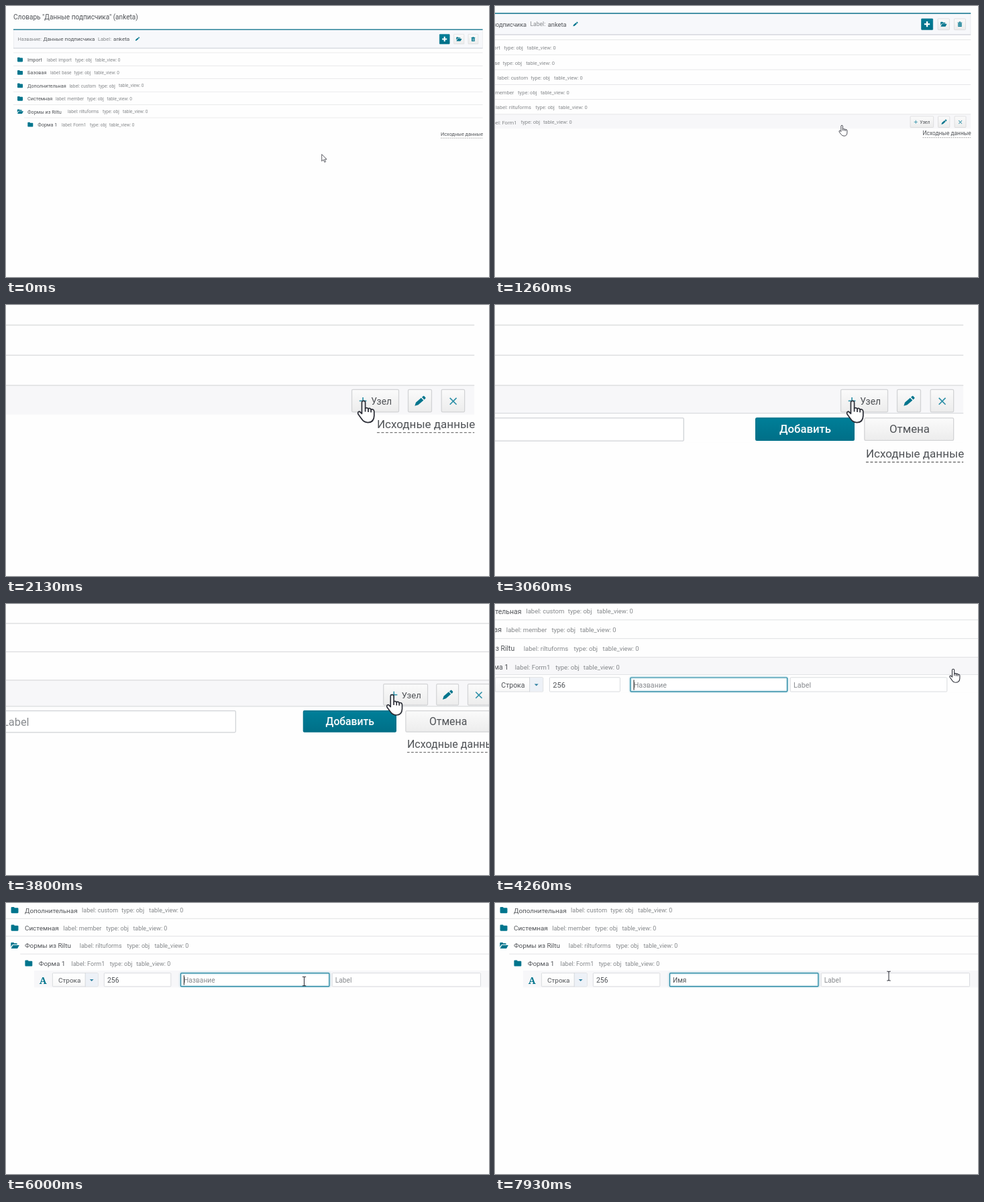
Recreate the animation shown at these times as an HTML page with a canvas. Size 720 by 405 pixels, loop 8000 ms.

```html
<!DOCTYPE html>
<html lang="ru">
<head>
<meta charset="utf-8">
<style>
  html, body { margin: 0; width: 100%; height: 100%; overflow: hidden; background: #fefefe; }
  canvas { display: block; width: 720px; height: 405px; }
</style>
</head>
<body>
<canvas id="stage" width="720" height="405"></canvas>
<script>
const ctx = document.getElementById('stage').getContext('2d');
const LOOP = 8000;
const TEAL = '#00758d', DARK = '#505357', GREY = '#85888b', RULE = '#dcdddf', HOVER = '#f7f7f9';
const ROW_TOP = 69.9, ROW_STEP = 19.42, FORM_TOP = 185.2, FORM_HEIGHT = 19, RIGHT = 710.6;

// name, label, then the x of the label, type and table_view captions
const rows = [
  ['Import', 'import', 61, 103, 133],
  ['Базовая', 'base', 66, 101.5, 131.5],
  ['Дополнительная', 'custom', 94.5, 138, 168],
  ['Системная', 'member', 74, 121, 150.5],
  ['Формы из Riltu', 'riltuforms', 92, 144, 174],
  ['Форма 1', 'Form1', 83, 125, 154]
];

const icons = {
  folder: new Path2D('M-4 -2.6Q-4 -3.4 -3.2 -3.4H-1Q-.3 -3.4 -.3 -2.5H3.2Q4 -2.5 4 -1.7V2.5Q4 3.3 3.2 3.3H-3.2Q-4 3.3 -4 2.5Z'),
  open: new Path2D('M-4.2 1.6V-2.6Q-4.2 -3.4 -3.4 -3.4H-1.4Q-.7 -3.4 -.7 -2.5H2Q2.8 -2.5 2.8 -1.1H-1.8Q-2.6 -1.1 -3 -.5ZM-4 3.3L-2.2 -.1Q-2 -.5 -1.5 -.5H5L3.2 2.8Q2.9 3.3 2.4 3.3Z'),
  pencil: new Path2D('M-3.5 3.2L-2.8 1L.6 -2L2.1 -.4L-1.3 2.6ZM1.1 -2.4L1.9 -3.1Q2.3 -3.4 2.7 -3L3.4 -2.2Q3.7 -1.8 3.3 -1.5L2.6 -.8Z'),
  trash: new Path2D('M-3 -2.6H-1V-3.5H1V-2.6H3V-1.7H-3ZM-2.5 -1.2H2.5V3.4H-2.5ZM-1.3 -.4V2.6H-.9V-.4ZM-.2 -.4V2.6H.2V-.4ZM.9 -.4V2.6H1.3V-.4Z'),
  plus: new Path2D('M-1 -3.6H1V-1H3.6V1H1V3.6H-1V1H-3.6V-1H-1Z'),
  caretDown: new Path2D('M-2.1 -1H2.1L0 1.2Z'),
  arrow: new Path2D('M0 0V10.2L2.4 8L4.2 11.8L5.8 11L4.1 7.4H7.4Z'),
  hand: new Path2D('M-1.7 1.1Q-1.7 0 -.6 0T.5 1.1V4.7Q1.5 4 2.4 5Q3.5 4.4 4.2 5.5Q6 5.1 6.2 6.8V9.6Q6.1 13.9 2.2 13.9Q-.4 13.9 -2 11.4L-4.1 8.5Q-4.6 7 -3.2 6.8L-1.7 8.2Z'),
  knuckles: new Path2D('M.5 4.7V7M2.4 5V7.2M4.2 5.5V7.4'),
  beam: new Path2D('M-2 -5H-.6L0 -4.5L.6 -5H2M0 -4.5V4.5M-2 5H-.6L0 4.5L.6 5H2')
};

const clamp = v => Math.max(0, Math.min(1, v));
const span = (t, a, b) => clamp((t - a) / (b - a));
const lerp = (a, b, p) => a + (b - a) * p;
const cubic = t => t < .5 ? 4 * t ** 3 : 1 - 4 * (1 - t) ** 3;
const sine = t => (1 - Math.cos(Math.PI * t)) / 2;
const mix = (a, b, p) => a.map((v, i) => lerp(v, b[i], p));

function text(str, x, y, size, color, weight = 400, family = 'Roboto, sans-serif') {
  ctx.font = `${weight} ${size}px ${family}`;
  ctx.fillStyle = color;
  ctx.fillText(str, x, y + size * .36);
}

function rect(x1, y1, x2, y2, color) {
  ctx.fillStyle = color;
  ctx.fillRect(x1, y1, x2 - x1, y2 - y1);
}

// the border lies inside the given edges
function box(x1, y1, x2, y2, fill, stroke, width = .55) {
  ctx.beginPath();
  ctx.roundRect(x1 + width / 2, y1 + width / 2, x2 - x1 - width, y2 - y1 - width, .7);
  ctx.fillStyle = fill;
  ctx.fill();
  ctx.strokeStyle = stroke;
  ctx.lineWidth = width;
  ctx.stroke();
}

function shade(y1, y2, from, to) {
  const g = ctx.createLinearGradient(0, y1, 0, y2);
  g.addColorStop(0, from);
  g.addColorStop(1, to);
  return g;
}

function button(x1, y1, x2, y2, primary) {
  if (primary) box(x1, y1, x2, y2, shade(y1, y2, '#007f99', '#006f87'), '#00728a');
  else box(x1, y1, x2, y2, shade(y1, y2, '#fbfbfb', '#ececec'), '#d2d3d5');
}

function icon(name, x, y, color = TEAL, scale = 1) {
  ctx.save();
  ctx.translate(x, y);
  ctx.scale(scale, scale);
  ctx.fillStyle = color;
  ctx.fill(icons[name], 'evenodd');
  ctx.restore();
}

function cross(x, y, r, turned) {
  ctx.save();
  ctx.translate(x, y);
  if (turned) ctx.rotate(Math.PI / 4);
  rect(-r, -.35, r, .35, '#2a8ea6');
  rect(-.35, -r, .35, r, '#2a8ea6');
  ctx.restore();
}

function drawHeader() {
  text('Словарь "Данные подписчика" (anketa)', 11, 16, 10.1, DARK);
  rect(11, 35, RIGHT, 63, '#f7f8fb');
  rect(11, 36, 11.6, 63, '#e6e8ec');
  rect(RIGHT - .6, 36, RIGHT, 63, '#e6e8ec');
  rect(11, 62.4, RIGHT, 63.7, '#d6d9de');
  rect(11, 34.5, RIGHT, 36, '#2a8299');
  text('Название:', 17.5, 49.5, 7.4, GREY);
  text('Данные подписчика', 55.5, 49.5, 8, DARK);
  text('Label:', 137, 49.5, 7.5, GREY);
  text('anketa', 160, 49.5, 8.1, DARK);
  icon('pencil', 196, 49.2, TEAL, .9);
  button(646, 42, 661.5, 57, true);
  button(667.4, 42, 683.1, 57);
  button(688.7, 42, 704.1, 57);
  icon('plus', 653.7, 49.4, '#fff');
  icon('open', 675, 49.5, TEAL, .9);
  icon('trash', 696.4, 49.5, TEAL, .95);
}

function drawRows(hovered) {
  rows.forEach(([name, label, labelX, typeX, tableX], i) => {
    const top = ROW_TOP + ROW_STEP * i, y = top + 10.4, indent = i === 5 ? 15.3 : 0;
    if (i === 5 && hovered) rect(27, top, RIGHT, 185.8, HOVER);
    rect(i === 5 ? 27 : 11, top - .3, RIGHT, top + .3, RULE);
    icon(i === 4 ? 'open' : 'folder', 21 + indent, y - .2);
    text(name, 32 + indent, y, 7.25, DARK);
    text('label: ' + label, labelX, y, 6.65, GREY);
    text('type: obj', typeX, y, 6.6, GREY);
    text('table_view: 0', tableX, y, 6.55, GREY);
  });
  if (!hovered) return;
  button(631.6, 169.4, 662.3, 184.4);
  button(667.8, 169.4, 683.4, 184.4);
  button(689.2, 169.4, 704.6, 184.4);
  cross(639, 177, 2.3);
  text('Узел', 644.2, 177.2, 6, DARK);
  icon('pencil', 675.8, 177);
  cross(697, 177.2, 3, true);
}

function drawLink(open) {
  const y = 191.8 + FORM_HEIGHT * open;
  text('Исходные данные', 648, y, 7.33, DARK);
  ctx.strokeStyle = '#777';
  ctx.lineWidth = .55;
  ctx.setLineDash([1.7, 1.1]);
  ctx.beginPath();
  ctx.moveTo(648, y + 5.6);
  ctx.lineTo(RIGHT, y + 5.6);
  ctx.stroke();
  ctx.setLineDash([]);
}

function caretOn(t) {
  if (t >= 6460) return t < 7500;
  return ((t - 3870) % 1060 + 1060) % 1060 < 530;
}

function drawForm(t, open, hovered, rowHovered) {
  ctx.save();
  ctx.beginPath();
  ctx.rect(0, FORM_TOP - .8, 720, FORM_HEIGHT * open + .8);
  ctx.clip();
  const y1 = 187.7, y2 = 203, y = 195.7;
  rect(42.3, FORM_TOP, RIGHT, FORM_TOP + 18.6, hovered ? HOVER : '#fefefe');
  if (rowHovered) rect(42.3, FORM_TOP - .6, RIGHT, FORM_TOP, '#dddfe2');
  text('A', 47.9, y + .3, 10.6, TEAL, 700, '"Noto Serif", serif');

  box(62.1, y1, 112.4, y2, shade(y1, y2, '#fff', '#f8f8f8'), '#cfd2d6');
  rect(98.2, y1 + .5, 111.9, y2 - .5, '#edf1f7');
  rect(97.9, y1, 98.5, y2, '#cfd2d6');
  icon('caretDown', 105.2, y, '#2b7fa0');
  text('Строка', 68.8, y, 7.3, DARK);
  box(118.6, y1, 192.2, y2, '#fff', '#cfd2d6');
  text('256', 122.3, y, 7.7, DARK);

  ctx.save();
  ctx.shadowColor = 'rgba(0,130,165,.45)';
  ctx.shadowBlur = 3;
  box(202.3, y1, 365.7, y2, '#fff', '#2787a2', .85);
  ctx.restore();
  const typed = t < 6460 ? '' : t < 6930 ? 'И' : t < 7000 ? 'Им' : 'Имя';
  text(typed || 'Название', 206, y, 7.5, typed ? DARK : '#888b8f');
  if (caretOn(t)) {
    const x = 206.2 + (typed ? ctx.measureText(typed).width : 0);
    rect(x - .3, 190.5, x + .45, 201, '#222');
  }
  box(368.2, y1, 531.2, y2, '#fff', '#cfd2d6');
  text('Label', 371.8, y, 7.5, '#888b8f');

  button(576.9, y1, 640.7, y2 - .3, true);
  button(646.8, y1, 704.6, y2 - .3);
  text('Добавить', 592.4, y - .6, 7.2, '#fff', 500);
  text('Отмена', 663.1, y - .6, 7.25, DARK);
  ctx.restore();
}

function pointerAt(t) {
  if (t < 700) return mix([470.7, 221.7], [508, 183], sine(span(t, 0, 620)));
  if (t < 3000) return mix([508, 183], [640, 177], sine(span(t, 800, 2130)));
  if (t < 7300) {
    const p = sine(span(t, 3740, 5060));
    return [lerp(640, 337.8, p), lerp(177, 197, p * p)];
  }
  return mix([337.8, 197], [442.5, 191.2], sine(span(t, 7340, 7940)));
}

function drawPointer(kind, [x, y]) {
  ctx.save();
  ctx.translate(x, y);
  ctx.lineJoin = 'round';
  ctx.strokeStyle = '#2b2d36';
  ctx.lineWidth = .75;
  ctx.fillStyle = '#fff';
  if (kind !== 'beam') ctx.fill(icons[kind]);
  ctx.stroke(icons[kind]);
  if (kind === 'hand') ctx.stroke(icons.knuckles);
  ctx.restore();
}

function cameraAt(t) {
  const wide = [1, 0, 0], close = [2.32, -950.4, -267.3], form = [1.362, -15.6, -151.3];
  return t < 3000
    ? mix(wide, close, cubic(span(t, 914, 2064)))
    : mix(close, form, cubic(span(t, 3422, 4572)));
}

function draw(t) {
  const [scale, x, y] = cameraAt(t);
  const pointer = pointerAt(t);
  const open = sine(span(t, 2740, 3050));
  const onRow = pointer[1] < 186, onForm = open === 1 && !onRow;
  ctx.setTransform(1, 0, 0, 1, 0, 0);
  rect(0, 0, 720, 405, '#fefefe');
  ctx.setTransform(scale, 0, 0, scale, x, y);
  drawHeader();
  drawRows(onRow);
  if (open > 0) drawForm(t, open, onForm, onRow);
  drawLink(open);
  drawPointer(onRow ? 'hand' : onForm ? 'beam' : 'arrow', pointer);
}

function tick() {
  draw(performance.now() % LOOP);
  requestAnimationFrame(tick);
}
tick();
</script>
</body>
</html>
```
